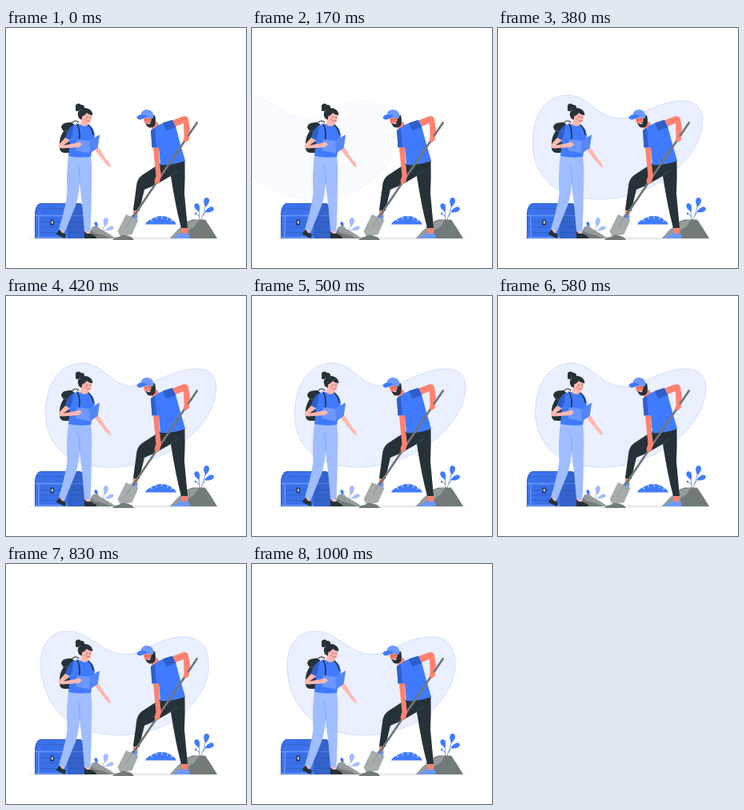
These frames come from a looping animation (300x300 px, 1040 ms). An HTML page:

```html
<!DOCTYPE html>
<html lang="en">
<head>
<meta charset="utf-8">
<title>Treasure dig</title>
<style>
  html, body { margin: 0; width: 100%; height: 100%; overflow: hidden; background: #fff; }
  svg { display: block; width: 100vw; height: 100vh; }

  :root {
    --blue: #407bff; --deep: #2f5fca; --light: #6c98ff; --sky: #a0bdff;
    --ink: #263238; --skin: #ffb8b0; --tan: #ff8270; --rock: #959b9b; --shade: #737a7a;
  }
  .blue { fill: var(--blue); }
  .deep { fill: var(--deep); }
  .light { fill: var(--light); }
  .sky { fill: var(--sky); }
  .ink { fill: var(--ink); }
  .skin { fill: var(--skin); }
  .tan { fill: var(--tan); }
  .rock { fill: var(--rock); }
  .shade { fill: var(--shade); }
  .line { fill: none; stroke-linecap: round; stroke-linejoin: round; }

  /* entrance, swing back, settle, short rest */
  .blob {
    fill: #eaf0ff; stroke: #93aae6; stroke-width: .35;
    transform-box: fill-box; transform-origin: center;
    animation: slide 1040ms cubic-bezier(.36, -.01, .5, 1.38) infinite,
               appear 1040ms step-end infinite;
  }
  @keyframes slide {
    0% { transform: translateX(-50%) skewX(20deg); opacity: 0; }
    56.25% { transform: translateX(0) skewX(-10deg); opacity: 1; }
    75.48% { transform: translateX(0) skewX(2deg); opacity: 1; }
    94.71%, 100% { transform: translateX(0) skewX(0deg); opacity: 1; }
  }
  @keyframes appear {
    0% { visibility: hidden; }
    12.5%, 100% { visibility: visible; }
  }
</style>
</head>
<body>
<svg viewBox="0 0 300 300">
  <defs>
    <path id="leaf" d="M0 0C-2-3-4-5-4-8.5C-4-14 4-14 4-8.5C4-5 2-3 0 0Z"/>
  </defs>

  <path class="blob" d="M44 127C44 100 58 84 79 84C106 84 122 113 150 113C174 113 190 92 223 91C244 91 254 104 254 125C254 165 210 214 140 214C80 214 44 178 44 127Z"/>

  <ellipse cx="148" cy="263" rx="122.5" ry="1.9" fill="#ededed"/>

  <g id="chest">
    <path fill="#3a71ea" d="M36 263V232Q37 221 43 219H92Q101 221 102 232V263Z"/>
    <path fill="#3363cb" d="M78 263V232Q78 222 72 219H92Q101 221 102 232V263Z"/>
    <path class="line" stroke="#2c58b8" stroke-width=".7" d="M39 226H76M42 242.5H71M42 249H71M42 255.5H71M79 242.5H101M79 249H101M79 255.5H101M78 232V263M36.4 263V232Q37 221 43 219.4H92"/>
    <path class="line" stroke="#6c98ff" stroke-width="1.4" d="M36.8 234.5H77M41 235V262.5M73 235V262.5M37 261.8H77"/>
    <path class="line" stroke="#4d80ee" stroke-width="1" d="M79 234.5H101.5M42 233Q42 224 47 220M74 233Q74 224 69 220"/>
    <rect class="ink" x="55.5" y="239.5" width="4.5" height="7" rx="1.2"/>
    <path fill="#b9cdff" d="M56.7 241H58.9V243.2L58.4 245H57.2L56.7 243.2Z"/>
  </g>

  <g id="left-plant">
    <path class="line" stroke="#5f7fc8" stroke-width=".5" d="M117 256Q117 248 112 243M120 257Q122 248 125 241M121 254Q127 252 133 250"/>
    <g class="sky">
      <use href="#leaf" transform="translate(124 249) rotate(6) scale(.75 .95)"/>
      <use href="#leaf" transform="translate(124 253) rotate(68) scale(.6 .9)"/>
    </g>
    <g class="blue">
      <use href="#leaf" transform="translate(114 249) rotate(-20) scale(.5 .55)"/>
      <use href="#leaf" transform="translate(113 253) rotate(-50) scale(.5 .5)"/>
    </g>
    <path class="rock" d="M104 263L107 250L112 247L121 253L130 258L137 263Z"/>
    <path class="shade" d="M104 263L106 252L110 256L122 259L131 263Z"/>
  </g>

  <g id="bush">
    <path class="blue" d="M174 245.5Q176 241 181 239.5Q187 235 194 235Q203 235 207 239.5Q211 241 213 245.5Z"/>
    <path class="line" stroke="#fff" stroke-width=".8" d="M180 239L183 241.5M187 235.5L188.5 239M195 234.5V238M203 236L201.5 239.5M209 240L206 242"/>
  </g>

  <g id="right-plant">
    <path class="line" stroke="#2d57b5" stroke-width=".6" d="M243 241Q248 232 250 217M242 240Q242 230 239 222M246 234Q250 229 256 227M241 235L237 232"/>
    <g class="blue">
      <use href="#leaf" transform="translate(249.5 224) rotate(8) scale(.85 .95)"/>
      <use href="#leaf" transform="translate(248 230) rotate(68) scale(.75 1)"/>
      <use href="#leaf" transform="translate(241.5 230) rotate(-22) scale(.8 .9)"/>
      <circle cx="237" cy="232" r="1.2"/>
    </g>
    <path class="shade" d="M205 263L213 254L226 242L233 239.5H249L256 250L264 263Z"/>
    <path class="rock" d="M205 263L213 254L226 242L241 240L235 249L229 252L225 263Z"/>
  </g>

  <g id="woman">
    <path class="ink" d="M82 118Q70 117 69 124Q70 127 72 129Q66 137 67 149Q67 156 73 156H83L91 125Z"/>
    <path class="line" stroke="#5b6a72" stroke-width=".8" d="M72 128Q77 131 83 127M70 143Q75 145 79 143"/>
    <path class="line" stroke="#263238" stroke-width="1.1" d="M83 118Q87 114 91 118"/>

    <path class="skin" d="M112 147L117 151L125 164L129 168L131.5 174.5L128 173L124 168.5L112 154Z"/>

    <path class="skin" d="M67 249H74L72 257L67 256ZM98 252H105V259H99Z"/>
    <path class="ink" d="M67 252L70 256L74 257L74.5 262.5H72L62.5 257.5ZM98 254L101 257L106 257L113 261V263H98Z"/>
    <path class="sky" d="M78 159H106Q108 176 107 196Q107 224 105.5 254H98Q96 225 92 194Q91 210 87 222L74 254L66 251.5Q74 226 76.5 207Q75 181 78 159Z"/>
    <path class="line" stroke="#7198ee" stroke-width=".6" d="M92 194Q93 181 90 171"/>

    <path class="skin" d="M95 113L103 118L102 124Q97 127 92 122Z"/>
    <path class="blue" d="M92 120Q97 125 103 121Q110 124 111 134L106 161Q92 163 78 160L80 143L74 137Q78 125 85 121Z"/>
    <path class="deep" d="M74 137Q77 125 84 121.5L83 132L80 140Z"/>
    <path class="line" stroke="#263238" stroke-width="1.6" d="M89 120Q94 130 91 142M103 121Q108 126 109 133"/>

    <path class="skin" d="M74 137L80 140.5L72 146.5L87 144L92 142L95 145L91 149L70 150.5Q65 150 66 146Z"/>
    <path class="light" d="M89 139L104 141L117 133.5L114.5 150L105 156.5L87 153Z"/>
    <path fill="#5487f6" d="M104 141L117 133.5L114.5 150L105 156.5Z"/>
    <path class="skin" d="M86 144L92 142.5L95 145.5L91 149L85 149Z"/>

    <path class="skin" d="M94 107Q101 103 106.5 107Q108 115 105 118.5Q99 121 95 116Z"/>
    <g class="ink">
      <circle cx="90.5" cy="98" r="3.6"/>
      <circle cx="94.5" cy="99.5" r="3.6"/>
      <circle cx="89.5" cy="101.5" r="2.6"/>
      <path d="M91 112.5Q88 106 92 103Q98 98 103 101Q108 103 108.5 109Q104 109 101 106Q98 110 95.5 110L94.5 115Z"/>
    </g>
    <path class="line" stroke="#263238" stroke-width=".8" d="M101 111V112M105 111V112"/>
    <path class="line" stroke="#c6453f" stroke-width=".8" d="M101 116Q103 117 104.5 115.5"/>
    <circle cx="99" cy="114" r="1.2" fill="#f98e84"/>
  </g>

  <g id="man">
    <path class="tan" d="M159.5 225H166L164 235H158.5ZM219 247H226L227 258H220Z"/>
    <path class="light" d="M158 233L165 234.5L163.5 240L155 244L153 241ZM219 255.5Q223 258.5 228 256L230 263H208Q209 260.5 213 260Z"/>

    <path class="ink" d="M193 169L223.5 166Q224 187 223 207L227 250H219Q212 224 206 185L187 196L173 202L166.5 229L159 227.5L163 198Q163.5 189 170 184Z"/>
    <path class="line" stroke="#50606a" stroke-width=".6" d="M206 185Q209 181 215 179"/>

    <path class="tan" d="M180 120L189 117L193 126L184 130Z"/>
    <path class="tan" d="M208 115.5L221 110.5Q227 109 228 114L230 127L228.5 140L223 141L222.5 134L222 119L212 123Z"/>
    <path class="blue" d="M181 128Q184 126 191 121L207 115L212 123L218 145L224 166Q209 172 193 171L191 150L182.5 149Z"/>
    <path class="deep" d="M196 118.5L208 115L212.5 124L200 128.5ZM181 128L186 125L188 149.5H182.5Z"/>

    <path class="line" stroke="#707677" stroke-width="2.7" stroke-linecap="butt" d="M238.7 118.5L157 239"/>
    <path fill="#a6abab" d="M150 233L165.5 240L157.5 258L143 261L139.5 254Z"/>
    <path class="line" stroke="#858b8b" stroke-width=".8" d="M157 238L151 248"/>
    <path class="shade" d="M133 265Q136 261.5 141 261L146 258.5L153 260Q158 261 160 265Z"/>

    <path class="tan" d="M184 149.5H191L192 169L194 185L192 193L187 195.5L185.5 191L187.5 185Z"/>
    <path class="tan" d="M223 136L229 135L228.5 140L225 143L221.5 141Z"/>

    <path class="tan" d="M172 111H186V118Q184 123 179 123Q173 121 172 115Z"/>
    <path class="ink" d="M182 110L186 109Q188 117 186 122Q181 126.5 176.5 123L174.5 119Q180 120 181.5 116Z"/>
    <path class="line" stroke="#fff" stroke-width="1" d="M177 119.5Q179 120.3 180.5 119"/>
    <path class="line" stroke="#263238" stroke-width=".8" d="M175 114.5V115.3M179 114V114.8"/>
    <path class="light" d="M168.5 108.5Q169 103 175 102Q183 101.5 184.5 109L184 113Q176 111 169.5 114Q165 115.5 163.5 112Q164.5 109 168.5 108.5Z"/>
    <path class="blue" d="M168.5 108.5Q174 107.5 177 111Q172 112 169.5 114Q165 115.5 163.5 112Q164.5 109 168.5 108.5Z"/>
  </g>
</svg>
</body>
</html>
```
